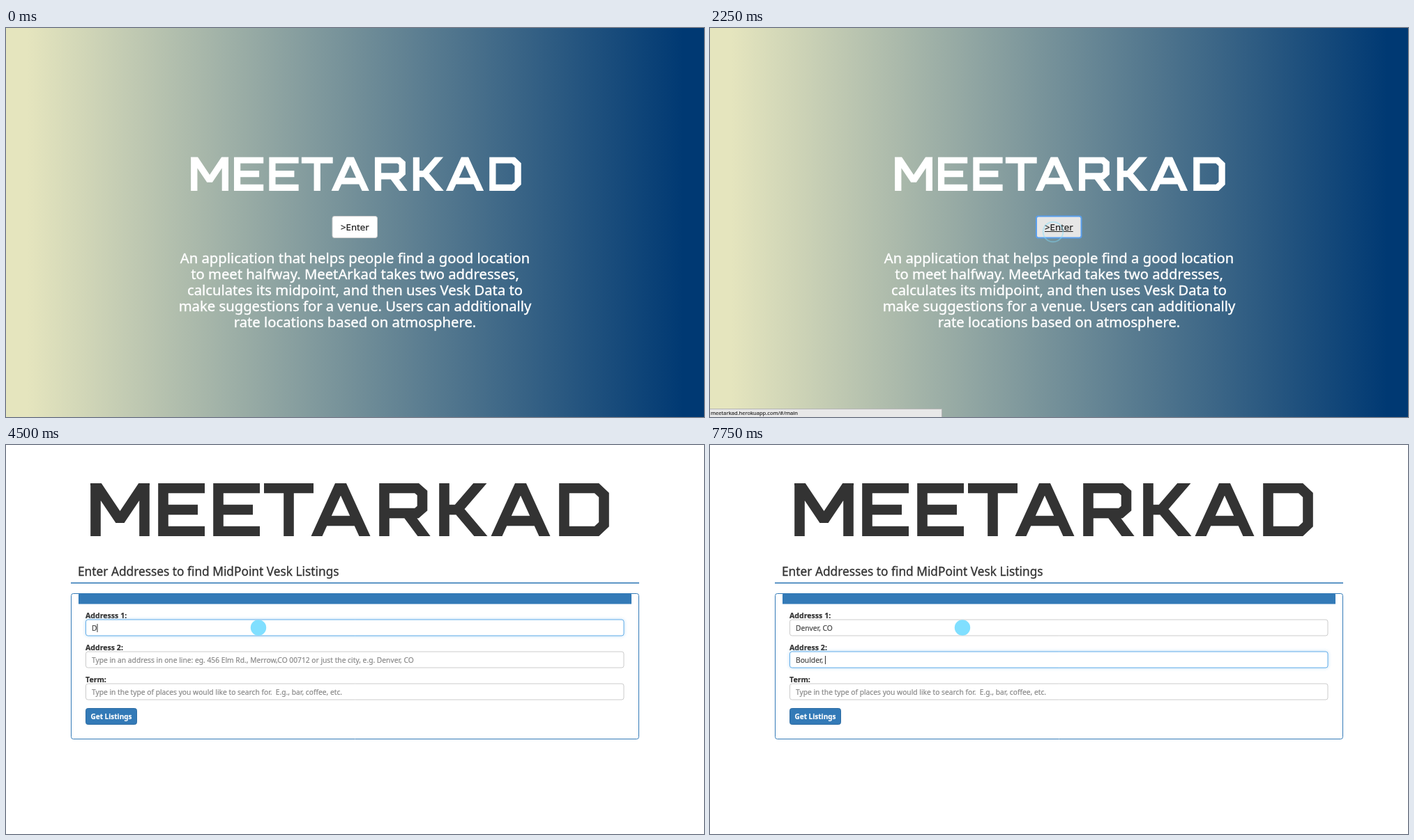
Write an HTML page with a canvas that moves like this. It is 1001 px wide and 559 px high and loops after 8000 ms.

```html
<!DOCTYPE html>
<html lang="en">
<head>
<meta charset="utf-8">
<title>MeetArkad</title>
<style>
  html, body { margin: 0; width: 100%; height: 100%; overflow: hidden; background: #fff; }
  canvas { display: block; }
</style>
</head>
<body>
<canvas id="stage" width="1001" height="559" role="img" aria-label="MeetArkad"></canvas>
<script>
const W = 1001, H = 559, LOOP = 8000, TICK = 250;
const ctx = document.getElementById('stage').getContext('2d');
const BLUE = '#337ab7', INK = '#333';

// Angular display letters: width and centre lines, cut off at a height of 76
const CAP = 76;
const GLYPHS = {
  M: [85, 'M7.5 76V0M77.5 76V0M3 -6L42.5 53L82 -6'],
  E: [67, 'M67 7H7.5V69H67M7.5 38H57'],
  T: [71, 'M0 7H71M35.5 0V76'],
  A: [86, 'M4 86L43 0L82 86M18 54H68'],
  R: [74, 'M7.5 76V7H54L62 14V36L54 43H7.5M40 43L69 82'],
  K: [70, 'M7.5 0V76M64 -6L27 37L65 82M7 38H28'],
  D: [72, 'M7.5 7H54L64.5 17V59L54 69H7.5Z']
};
const GAP = 12, KERN = { ET: -6, TA: -16, KA: -8 };

const INTRO = [
  'An application that helps people find a good location',
  'to meet halfway. MeetArkad takes two addresses,',
  'calculates its midpoint, and then uses Vesk Data to',
  'make suggestions for a venue. Users can additionally',
  'rate locations based on atmosphere.'
];
const SAMPLE = '456 Elm Rd., Merrow,CO 00712 or just the city, e.g. Denver, CO';
const FIELDS = [
  ['Addresss 1:', 'Type in an address in one line: e.g.   ' + SAMPLE],
  ['Address 2:', 'Type in an address in one line: eg. ' + SAMPLE],
  ['Term:', 'Type in the type of places you would like to search for.  E.g., bar, coffee, etc.']
];

// Pointer rests: time, x, y
const STOPS = [
  [500, 670, 119], [1500, 502, 300], [2250, 492, 293], [2750, 492, 293], [3750, 362, 274]
];

const typed = (word, start, rate, t) =>
  word.slice(0, Math.max(0, Math.floor((t - start) / 1000 * rate)));

// A hairline outline gives the regular weight a little more body
function text(str, x, y, size, color, weight = 400, align = 'left') {
  ctx.font = `${weight} ${size}px "Noto Sans", "Open Sans", sans-serif`;
  ctx.fillStyle = ctx.strokeStyle = color;
  ctx.lineWidth = size * .018;
  ctx.textAlign = align;
  ctx.fillText(str, x, y);
  ctx.strokeText(str, x, y);
  return ctx.measureText(str).width;
}

function box(x, y, w, h, r, fill, border, glow) {
  ctx.beginPath();
  ctx.roundRect(x, y, w, h, r);
  if (fill) {
    ctx.save();
    if (glow) {
      ctx.shadowColor = 'rgba(102,175,233,.6)';
      ctx.shadowBlur = 5;
    }
    ctx.fillStyle = fill;
    ctx.fill();
    ctx.restore();
  }
  if (border) {
    ctx.strokeStyle = border;
    ctx.lineWidth = 1;
    ctx.stroke();
  }
}

function title(x, y, scale, color) {
  const name = 'MEETARKAD';
  ctx.save();
  ctx.translate(x, y);
  ctx.scale(scale, scale);
  ctx.strokeStyle = color;
  ctx.lineWidth = 14.6;
  ctx.miterLimit = 1.5;
  [...name].forEach((letter, i) => {
    const [width, lines] = GLYPHS[letter];
    ctx.save();
    ctx.beginPath();
    ctx.rect(0, 0, width, CAP);
    ctx.clip();
    ctx.stroke(new Path2D(lines));
    ctx.restore();
    ctx.translate(width + GAP + (KERN[name.slice(i, i + 2)] || 0), 0);
  });
  ctx.restore();
}

function home(t) {
  const sky = ctx.createLinearGradient(0, 0, W, 0);
  sky.addColorStop(.03, '#e5e5be');
  sky.addColorStop(.97, '#003973');
  ctx.fillStyle = sky;
  ctx.fillRect(0, 0, W, H);
  title(265, 185.5, .637, '#fff');

  const hover = t >= 2000;
  box(468, 270.5, 64.5, 31, 3, hover ? '#e6e6e6' : '#fff', hover ? '#adadad' : '#ccc');
  if (t >= 2250) {
    ctx.lineWidth = 2;
    ctx.strokeStyle = '#5a9fec';
    ctx.stroke();
  }
  const width = text('>Enter', 480, 290.5, 13.2, '#222');
  if (hover) ctx.fillRect(480, 292, width, 1);
  INTRO.forEach((line, i) => text(line, 500.5, 338 + 23 * i, 20.25, '#fff', 400, 'center'));
}

function form(t) {
  ctx.fillStyle = '#fff';
  ctx.fillRect(0, 0, W, H);
  title(121, 55, 1, INK);
  text('Enter Addresses to find MidPoint Vesk Listings', 103, 188, 17.3, INK);
  ctx.fillStyle = BLUE;
  ctx.fillRect(93, 197.5, 815, 1.6);
  box(93.5, 213.5, 814, 209, 3, null, BLUE);
  box(104, 213, 793, 15.5, [2, 2, 0, 0], BLUE);

  const values = [typed('Denver, CO', 4250, 4.6, t), typed('Boulder, ', 6500, 7.4, t)];
  const focus = t >= 6500 ? 1 : t >= 4000 ? 0 : -1;
  FIELDS.forEach(([label, hint], i) => {
    const y = 46 * i, on = i === focus, value = values[i];
    text(label, 114, 248.5 + y, 10.6, INK, 700);
    box(114.5, 251 + y, 771.5, 23, 3, '#fff', on ? '#66afe9' : '#ccc', on);
    const width = text(value || hint, 123, 266.8 + y, 10.25, value ? '#444' : '#888');
    if (on) {
      ctx.fillStyle = INK;
      ctx.fillRect(123 + (value ? width : 0), 257 + y, 1, 12);
    }
  });
  box(114.5, 378.5, 73, 23, 3, BLUE, '#2e6da4');
  text('Get Listings', 151, 393.6, 10, '#fff', 600, 'center');
}

function status() {
  box(-1, 547.5, 333.5, 14, 0, '#e8e8e8', '#b5b5b5');
  text('meetarkad.herokuapp.com/#/main', 1, 556, 7.55, '#222');
}

// Sideways motion starts slower than the vertical one, which bends the path
function pointerAt(t) {
  const next = STOPS.findIndex(stop => stop[0] > t);
  if (next < 0) return STOPS[STOPS.length - 1].slice(1);
  const [t0, x0, y0] = STOPS[next - 1], [t1, x1, y1] = STOPS[next];
  const p = (t - t0) / (t1 - t0);
  return [x0 + (x1 - x0) * p * p, y0 + (y1 - y0) * p];
}

function pointer(t) {
  if (t < STOPS[0][0]) return;
  ctx.beginPath();
  if (t >= 4250) {
    ctx.arc(362, 262.5, 11.2, 0, 7);
    ctx.fillStyle = '#80dfff';
    ctx.fill();
    return;
  }
  const [x, y] = pointerAt(t);
  ctx.arc(x, y, 14.3, 0, 7);
  ctx.strokeStyle = 'rgba(128,223,255,.42)';
  ctx.lineWidth = 2;
  ctx.stroke();
}

function draw(now) {
  const t = Math.floor((now % LOOP) / TICK) * TICK;
  (t < 2500 ? home : form)(t);
  if (t >= 2000 && t < 3000) status();
  pointer(t);
}

const start = performance.now();
function loop() {
  draw(performance.now() - start);
  requestAnimationFrame(loop);
}
loop();
</script>
</body>
</html>
```
